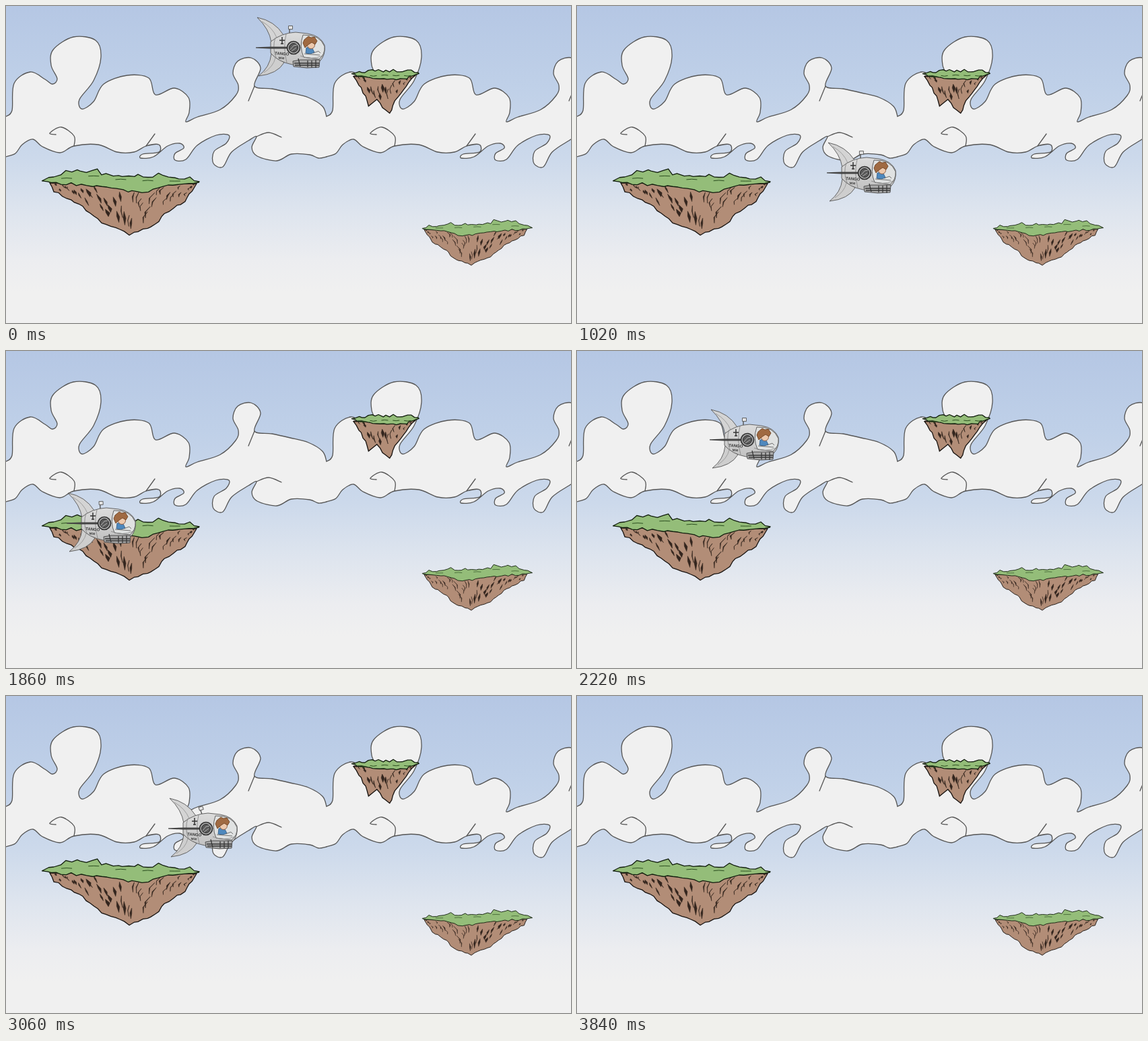
Animation of 839x471 px, one loop 4.86 s. Source, as an HTML page:

```html
<!DOCTYPE html>
<html lang="en">
<head>
<meta charset="utf-8">
<title>Flight between islands</title>
<style>
  html, body { margin: 0; width: 100%; height: 100%; overflow: hidden; background: #f0f0f0; }
  svg { display: block; width: 100%; height: 100%; }
  .line { fill: none; stroke: #555; stroke-width: 1.3; stroke-linecap: round; stroke-linejoin: round; }
  .cloud { fill: #f0f0f0; }
  .rock { fill: #b28d77; stroke: #17120f; stroke-width: 1.3; }
  .grass { fill: #94bd79; stroke: #101c0c; stroke-width: 1.3; stroke-linejoin: round; }
  .crack { fill: #33251e; stroke: #33251e; stroke-width: .6; }
  .blade { fill: none; stroke: #2c4f20; }
  #ship { stroke: #555; stroke-width: .9; stroke-linejoin: round; }
  #ship text { font: bold 6px "Liberation Sans", Arial, sans-serif; fill: #333; stroke: none; }
</style>
</head>
<body>
<svg viewBox="0 0 839 471">
  <defs>
    <linearGradient id="sky" x1="0" y1="0" x2="0" y2="1">
      <stop offset="0" stop-color="#b5c7e4"/>
      <stop offset=".25" stop-color="#bfd0e8"/>
      <stop offset=".48" stop-color="#ccd9eb"/>
      <stop offset=".64" stop-color="#dde4ee"/>
      <stop offset=".8" stop-color="#ecedf0"/>
      <stop offset=".9" stop-color="#f0f0f0"/>
    </linearGradient>
    <linearGradient id="hull" x1="0" y1="0" x2="0" y2="1">
      <stop offset="0" stop-color="#dcdcdc"/>
      <stop offset="1" stop-color="#c2c2c2"/>
    </linearGradient>
    <g id="clouds"></g>
    <g id="island"></g>
  </defs>
  <rect width="839" height="471" fill="url(#sky)"/>
  <use href="#clouds"/>
  <use href="#clouds" x="476"/>
  <use href="#island"/>
  <use href="#island" transform="translate(782 318) scale(-.7 .69) translate(-53 -243)"/>
  <g id="islet"></g>
  <g id="ship">
    <path fill="#d4d4d4" d="M373 17Q399 22 412 43L394 54Q391 34 373 17Z"/>
    <path fill="#cecece" d="M375 104Q403 101 413 84L394 71Q392 91 375 104Z"/>
    <path fill="none" stroke="#999" d="M380 23Q396 32 402 47M383 99Q397 90 400 77"/>
    <g id="antenna">
      <path fill="none" stroke-width="1.4" d="M421 41V33"/>
      <rect x="419.500" y="29.500" width="6" height="5" fill="#e4e4e4"/>
    </g>
    <path fill="url(#hull)" d="M393 53Q409 40 430 39L448 41Q467 44 473 58Q475 73 466 82Q449 90 425 87Q404 83 393 70Z"/>
    <path fill="#e0e2e2" d="M441 43Q466 42 473 60Q474 72 465 79L442 76Q435 60 441 43Z"/>
    <path fill="none" stroke="#888" d="M400 47Q395 61 401 77M416 42Q411 62 417 84M437 74Q453 81 470 74"/>
    <path fill="#444" stroke="none" d="M371 61.3L392 60.5H417V63.5H392L371 62.5Z"/>
    <circle cx="427" cy="62" r="9.500" fill="#aaa" stroke="#333" stroke-width="1.7"/>
    <circle cx="427" cy="62" r="6.500" fill="#595959" stroke="#222"/>
    <path fill="none" stroke="#bbb" d="M422 65L427 59L432 58M424 67L431 62"/>
    <path fill="none" stroke="#333" stroke-width="1.5" d="M410 46V56M406 51H414M408 56H412"/>
    <g transform="rotate(5 400 72)">
      <text x="399" y="72">TANGO</text>
      <text x="405" y="78" style="font-size:4.5px">M50</text>
    </g>
    <path fill="#4e88bd" stroke="#345f8b" d="M446 62L454 61L458 69L452 71L445 70Z"/>
    <circle cx="453" cy="58" r="5.500" fill="#edc9ad" stroke="#86573f"/>
    <path fill="#a06a42" stroke="#704323" d="M444 62L441 55L443 50L449 45L453 47L458 46L462 52L459 57L454 54L448 58Z"/>
    <path fill="none" stroke="#666" d="M456 70L464 67L467 70M443 71L466 73"/>
    <path fill="#aaa" stroke="#444" d="M426 82L437 80H466L465 91L447 92L427 90Z"/>
    <path fill="none" stroke="#373737" stroke-width="1.3" d="M428 85H465M429 88H465M448 81V91M454 81V91M460 80V92M434 78L437 90"/>
  </g>
</svg>
<script>
const STEP = 60, LOOP = 4860;
const byId = id => document.getElementById(id);
const mix = (a, b, u) => a + (b - a) * u;
const pairs = text => text.split(" ").map(p => p.split(",").map(Number));
const path = (kind, d) => `<path class="${kind}" d="${d}"/>`;

function seeded(seed) {
  return () => (seed = seed * 16807 % 2147483647) / 2147483647;
}

// Smooth curve through a few points, without the leading move.
function curve(points) {
  return points.slice(1).map((p, i) => {
    const a = points[i], before = points[i - 1] || a, after = points[i + 2] || p;
    const c1 = [0, 1].map(k => a[k] + (p[k] - before[k]) / 6);
    const c2 = [0, 1].map(k => p[k] - (after[k] - a[k]) / 6);
    return `C${c1} ${c2} ${p}`;
  }).join("");
}
const smooth = points => `M${points[0]}${curve(points)}`;

function drawClouds() {
  const upper = pairs("0,164 9,155 12,115 36,98 58,109 69,116 76,108 67,88 70,65 100,46 133,51 141,76 130,111 109,139 113,153 130,142 145,116 180,103 212,107 222,132 250,122 271,136 272,158 267,172 284,165 318,154 341,133 345,118 337,100 344,82 364,77 378,92 369,119 395,123 422,129 449,136 470,149 476,164");
  const lower = pairs("0,224 14,219 24,206 40,198 54,209 80,218 101,208 137,206 165,217 190,217 208,208 227,206 227,217 203,220 200,226 219,224 240,208 258,204 264,211 251,219 251,229 267,228 284,207 312,192 331,192 327,204 309,216 308,234 322,239 335,217 360,200 372,194 365,210 373,223 402,230 424,220 451,221 464,226 476,224");
  const folds = ["101,208 101,193 82,180 65,189 74,191", "369,119 360,141", "208,208 221,190", "372,194 390,188 409,195"];
  const back = [...lower].reverse();
  byId("clouds").innerHTML = path("cloud", `${smooth(upper)}L${back[0]}${curve(back)}Z`) +
    [upper, lower, ...folds.map(pairs)].map(p => path("line", smooth(p))).join("");
}

// Breaks a line into short pieces and pushes each joint by push().
function jagged(points, size, push) {
  return points.slice(1).flatMap((b, i) => {
    const a = points[i], count = Math.max(1, Math.round(Math.hypot(b[0] - a[0], b[1] - a[1]) / size));
    return Array.from({ length: count }, (_, k) => {
      const [dx, dy] = push();
      return [mix(a[0], b[0], k / count) + dx, mix(a[1], b[1], k / count) + dy];
    });
  });
}

function heightAt(points, x) {
  const i = Math.max(1, points.findIndex(p => p[0] >= x));
  const [a, b] = [points[i - 1], points[i]];
  return mix(a[1], b[1], (x - a[0]) / (b[0] - a[0]));
}

function drawIsland(id, { top, fringe, base, tip, spike, cracks, seed }) {
  const random = seeded(seed), spread = n => (random() - .5) * n;
  const [left, right] = [base[0][0], base[base.length - 1][0]];
  const rock = jagged(base, 7, () => [spread(2), spread(3)]);
  const blades = [
    ...jagged(top, spike, () => [spread(4), -spike * random() ** 3]),
    top[top.length - 1],
    ...jagged(fringe, spike, () => [spread(3), spike * .5 * random() ** 3])
  ];
  const wedges = Array.from({ length: cracks }, (_, i) => {
    const x = mix(left, right, (i + .5 + spread(.8)) / cracks);
    const roof = heightAt([...fringe].reverse(), x), room = heightAt(base, x) - roof;
    const y = roof + room * random() * .65, drop = room * mix(.15, .32, random());
    const lean = Math.max(-.5, Math.min(.5, (tip - x) / 80)) * drop;
    return `M${x} ${y}l${lean + spread(5)} ${drop * .5}L${x + lean} ${y + drop}L${x + lean * .6 - 2} ${y + drop * .45}Z`;
  });
  const strokes = Array.from({ length: 5 }, (_, i) => {
    const x = mix(left, right, (i + .4) / 5.4), y = heightAt(top, x);
    return `M${x} ${y + 5}q${spike} ${spread(4)} ${spike * 2} 0`;
  });
  byId(id).innerHTML = path("rock", `M${rock.join("L")}L${base[base.length - 1]}Z`) +
    path("crack", wedges.join("")) + path("grass", `M${blades.join("L")}Z`) + path("blade", strokes.join(""));
}

// Flights are chains of Bezier curves, each lasting a number of steps.
const flights = [
  { start: 12, at: k => {
    const u = k / 11, ease = u < .5 ? 2 * u * u : 1 - 2 * (1 - u) ** 2;
    return k < 11 && [371 - 50 * u ** 6, 17 + 451 * ease];
  } },
  { start: 27, at: k => along([
    [8, "112,448 82,275 82,113 116,76"],
    [9, "116,76 210,75 465,168 341,173"],
    [9, "341,173 295,110 230,99 235,208"],
    [4, "235,208 237,235 300,243 368,243"],
    [7, "368,243 532,243 695,243 859,243"]
  ], k) }
];

function along(curves, k) {
  for (const [steps, text] of curves) {
    if (k < steps) {
      const u = k / steps, v = 1 - u, [a, b, c, d] = pairs(text);
      return [0, 1].map(i => v ** 3 * a[i] + 3 * v * v * u * b[i] + 3 * v * u * u * c[i] + u ** 3 * d[i]);
    }
    k -= steps;
  }
}

function position(step) {
  const flight = step < flights[1].start ? flights[0] : flights[1];
  return flight.at(Math.max(0, step - flight.start));
}

function draw() {
  const step = Math.floor(performance.now() % LOOP / STEP);
  const place = position(step);
  byId("ship").style.display = place ? "" : "none";
  if (place) {
    const [x, y] = place, [lastX] = position(step - 1) || place;
    // The antenna folds down when the ship drifts backwards.
    const tilt = Math.max(-75, 2 * Math.min(0, x - lastX));
    byId("ship").setAttribute("transform", `translate(${Math.round(x - 371)} ${Math.round(y - 17)})`);
    byId("antenna").setAttribute("transform", `rotate(${tilt} 421 41)`);
  }
  requestAnimationFrame(draw);
}

drawClouds();
drawIsland("island", {
  top: pairs("53,260 72,254 104,245 150,252 190,255 235,254 287,261"),
  fringe: pairs("287,262 240,266 203,276 150,269 105,263 53,260"),
  base: pairs("66,264 72,275 108,294 143,321 176,336 184,340 222,325 236,308 265,290 283,264"),
  tip: 180, spike: 8, cracks: 46, seed: 77
});
drawIsland("islet", {
  top: pairs("513,101 545,98 580,98 612,99"),
  fringe: pairs("612,100 590,108 550,108 513,101"),
  base: pairs("517,106 531,128 538,149 550,140 569,160 578,141 598,114 608,103"),
  tip: 565, spike: 5, cracks: 20, seed: 31
});
draw();
</script>
</body>
</html>
```
